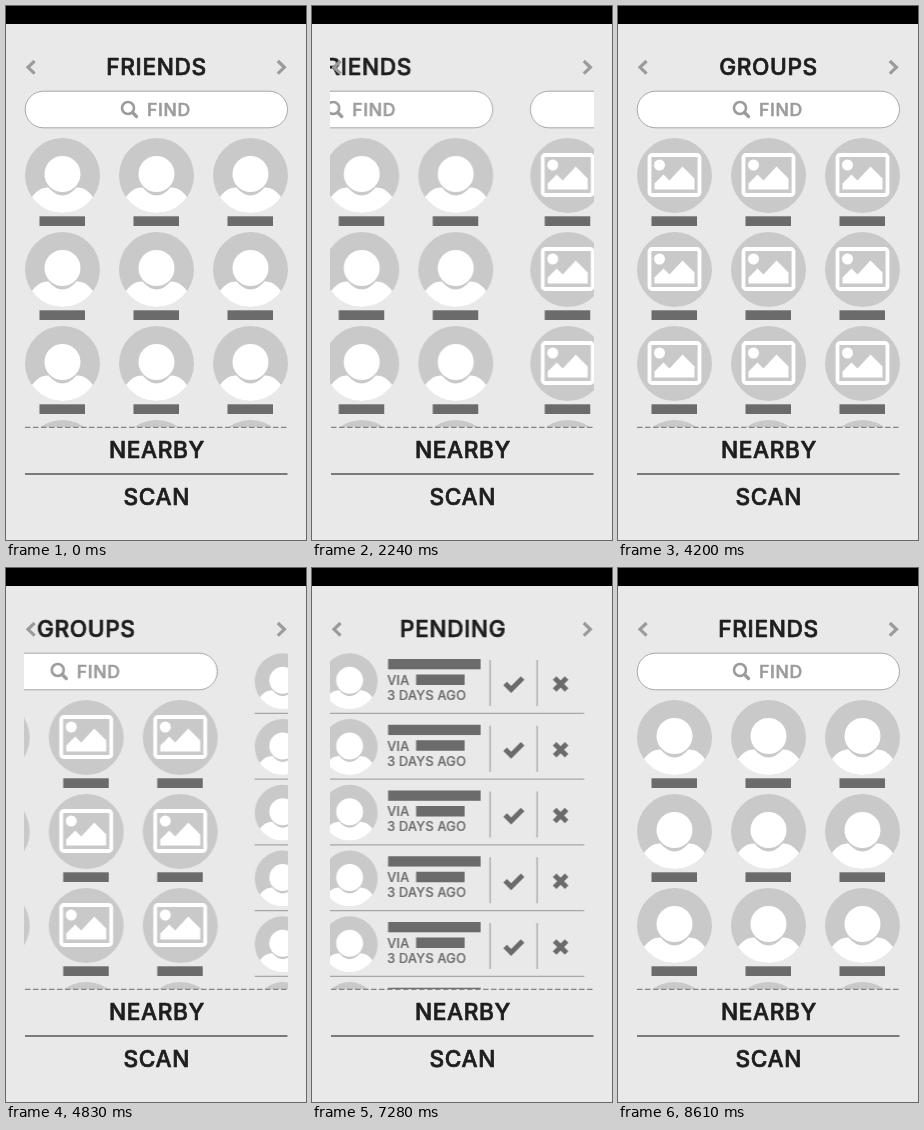
Write an HTML page that moves like this. It is 300 by 534 pixels and loops after 8.75 s.

```html
<!DOCTYPE html>
<html lang="en">
<head>
<meta charset="utf-8">
<title>Contact pages</title>
<style>
  html, body { margin: 0; width: 100%; height: 100%; overflow: hidden; background: #e9e9e9; }
  svg { display: block; width: 300px; height: 534px; }
  text { font-family: Inter, "Open Sans", sans-serif; font-weight: 500; stroke-linejoin: round; }
  .title { font-size: 22.7px; letter-spacing: .6px; text-anchor: middle; fill: #1e1e1e; stroke: #1e1e1e; stroke-width: .7; }
  .find { font-size: 17.6px; letter-spacing: .7px; fill: #9b9b9b; stroke: #9b9b9b; stroke-width: .6; }
  .note { font-size: 12.9px; letter-spacing: .15px; fill: #6b6b6b; stroke: #6b6b6b; stroke-width: .2; }
  .bar { fill: #6b6b6b; }
  .line { fill: none; stroke: #a6a6a6; stroke-width: 1.3; }
  .icon { fill: none; stroke: #6b6b6b; stroke-width: 5; }
  .arrow { fill: none; stroke: #9b9b9b; stroke-width: 3.2; }
  #track { animation: slide 8750ms infinite; }
  @keyframes slide {
    0% { transform: translateX(0); }
    23.086% { transform: translateX(0); animation-timing-function: cubic-bezier(.37, 0, .63, 1); }
    29.486% { transform: translateX(-300px); }
    53.143% { transform: translateX(-300px); animation-timing-function: cubic-bezier(.37, 0, .63, 1); }
    59.543% { transform: translateX(-600px); }
    82.48% { transform: translateX(-600px); animation-timing-function: cubic-bezier(.37, 0, .63, 1); }
    88.88%, 100% { transform: translateX(-900px); }
  }
</style>
</head>
<body>
<svg viewBox="0 0 300 534">
  <defs>
    <clipPath id="view"><rect x="18.5" y="18" width="263.5" height="403"/></clipPath>
    <clipPath id="disc"><circle r="37.5"/></clipPath>
    <g id="person">
      <circle r="37.5" fill="#c9c9c9"/>
      <path d="M-36 31C-29 16 -22 12 -14 12Q0 28 14 12C22 12 29 16 36 31V40H-36Z" fill="#fff" clip-path="url(#disc)"/>
      <circle cy="-1.5" r="18" fill="#fff"/>
    </g>
    <g id="photo">
      <circle r="37.5" fill="#c9c9c9"/>
      <rect x="-25" y="-20.5" width="50" height="40" rx="2.5" fill="none" stroke="#fff" stroke-width="3.8"/>
      <circle cx="-15" cy="-10.5" r="5.5" fill="#fff"/>
      <path d="M-20 14V8L-11 -1L-5 5L8 -9L20 3V14Z" fill="#fff"/>
    </g>
    <g id="search">
      <rect x="19.2" y="85.2" width="262.3" height="36.6" rx="18.3" fill="#fff" stroke="#a6a6a6"/>
      <circle cx="122" cy="102" r="6" fill="none" stroke="#9b9b9b" stroke-width="2.6"/>
      <path d="M126.5 106.5L130.5 110.5" stroke="#9b9b9b" stroke-width="3.2" stroke-linecap="round"/>
      <text class="find" x="141" y="109.8">FIND</text>
    </g>
    <g id="request">
      <use href="#person" transform="translate(47 113.3) scale(.747)"/>
      <rect class="bar" x="85.5" y="91" width="92.5" height="10.3"/>
      <text class="note" x="84.5" y="116.8">VIA</text>
      <rect class="bar" x="113.5" y="106.5" width="48.5" height="10.5"/>
      <text class="note" x="84.5" y="131.8">3 DAYS AGO</text>
      <path class="line" d="M187.5 92V138M234.5 92V138M19 145.3H281.5"/>
      <path class="icon" d="M202.5 115.5L208.5 121.5L220 110"/>
      <path class="icon" d="M252 110L264 122M264 110L252 122"/>
    </g>
  </defs>
  <rect width="300" height="534" fill="#e9e9e9"/>
  <rect width="300" height="18" fill="#000"/>
  <g clip-path="url(#view)"><g id="track"></g></g>
  <path class="arrow" d="M28.6 55L22 61.3L28.6 67.6M271.8 55L278.4 61.3L271.8 67.6"/>
  <path d="M19 421.3H281.5" stroke="#858585" stroke-width="1.3" stroke-dasharray="5.5 2.5"/>
  <text class="title" x="151" y="452.2">NEARBY</text>
  <path d="M19 468H281.5" stroke="#555" stroke-width="1.4"/>
  <text class="title" x="150.8" y="499.2">SCAN</text>
</svg>
<script>
  const repeat = (n, draw) => Array.from({ length: n }, (_, i) => draw(i)).join("");

  const grid = icon => '<use href="#search"/>' + repeat(12, i => {
    const x = 56.5 + 94 * (i % 3), y = 169.5 + 94 * Math.floor(i / 3);
    return `<use href="#${icon}" x="${x}" y="${y}"/>
      <rect class="bar" x="${x - 23}" y="${y + 40.8}" width="45.5" height="9.7"/>`;
  });

  const list = () => repeat(6, i => `<use href="#request" y="${i * 65.75}"/>`);

  const pages = [
    ["FRIENDS", grid("person")],
    ["GROUPS", grid("photo")],
    ["PENDING", list()],
    ["FRIENDS", grid("person")]
  ];

  document.getElementById("track").innerHTML = pages.map(([title, body], i) =>
    `<g transform="translate(${i * 300})"><text class="title" x="150.5" y="69.2">${title}</text>${body}</g>`
  ).join("");
</script>
</body>
</html>
```
